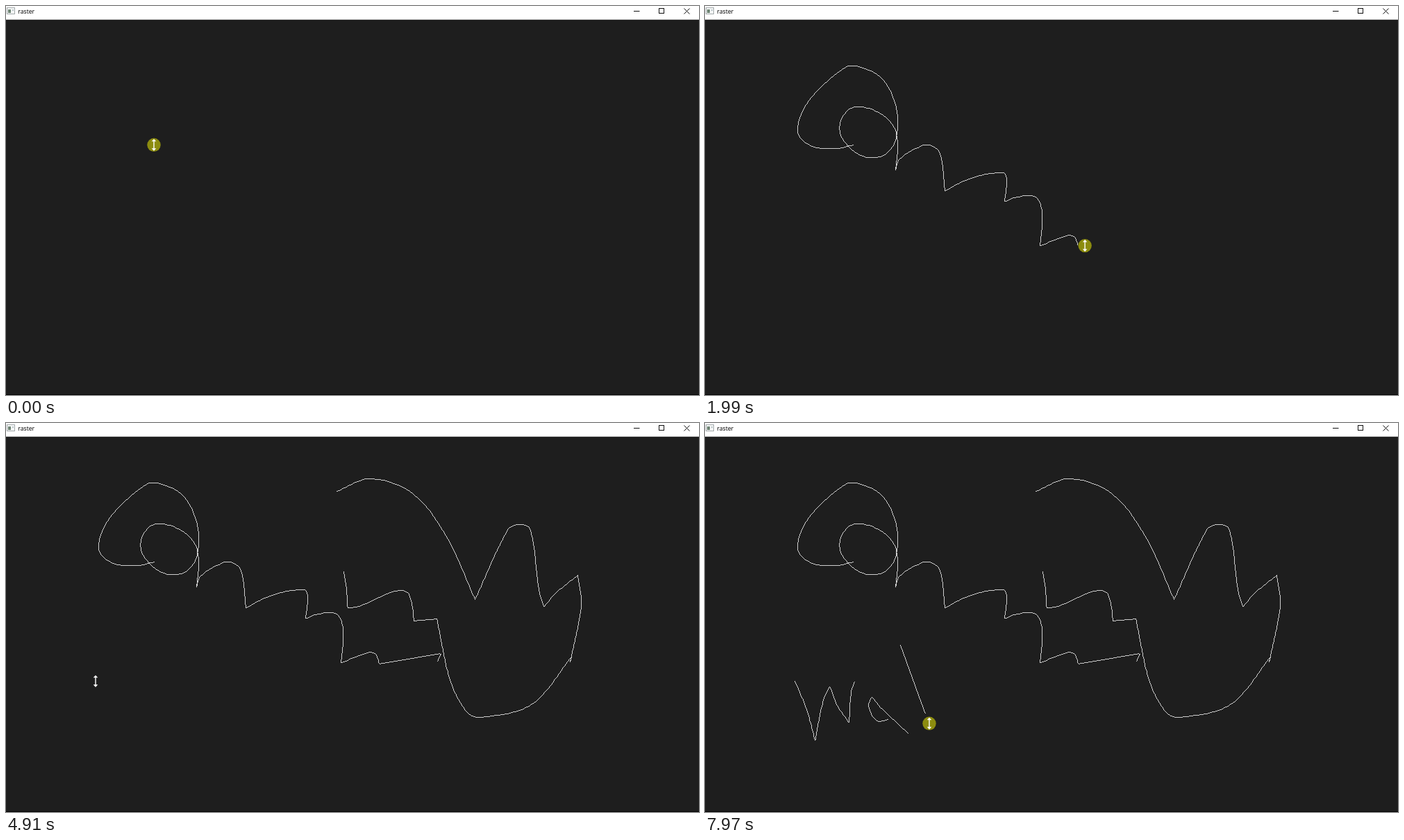
Recreate the animation shown at these times as an HTML page with a canvas. Size 998x561 px, loop 8 s.

```html
<!DOCTYPE html>
<html lang="en">
<head>
<meta charset="utf-8">
<title>raster</title>
<style>
  html, body { margin: 0; width: 100%; height: 100%; overflow: hidden; background: #1e1e1e; }
  canvas, svg { position: absolute; left: 0; top: 0; width: 998px; height: 561px; }
  .title { font: 8.7px "Open Sans", "Noto Sans", sans-serif; fill: #000; }
  .button { fill: none; stroke: #111; stroke-width: 1; }
</style>
</head>
<body>
<canvas id="ink" width="998" height="561"></canvas>
<svg viewBox="0 0 998 561">
  <rect y="560" width="998" height="1" fill="#050505"/>
  <rect width="998" height="19.7" fill="#fff"/>
  <g>
    <rect x="1.5" y="2.5" width="11" height="9" fill="#f4f6f6" stroke="#a3a9ab"/>
    <rect x="3" y="5" width="4" height="5" fill="#6f8574"/>
    <rect x="9" y="5" width="2" height="2" fill="#b9c4c8"/>
  </g>
  <text class="title" x="17.3" y="11">raster</text>
  <g class="button">
    <path d="M904 7.5H912.5"/>
    <rect x="940.5" y="3.5" width="7" height="7"/>
    <path d="M976.5 3.5L984.5 11.5M984.5 3.5L976.5 11.5"/>
  </g>
  <g id="cursor">
    <circle id="halo" r="9.7" fill="#ff0" fill-opacity=".49"/>
    <path d="M0-8.6L3.3-5H.7V5H3.3L0 8.6L-3.3 5H-.7V-5H-3.3Z" fill="#fff"/>
  </g>
</svg>
<script>
const LOOP = 8000, TICK = 66.42, LEAD = 18, INK_LAG = 0.4, SPACING = 3;

// Smooth curves through key points; "/" marks a sharp corner.
// A positive skew slows down along the way, a negative one speeds up.
const moves = [
  stroke(1, 33, 0.2, `213,200 188,205 152,201 133,180 150,135 200,89 221,87 254,104 274,142
    275,189 257,215 224,215 197,190 195,165 212,146 243,150 269,170 277,198 274,236 /
    280,220 312,201 326,201 338,212 345,266 / 382,248 429,240 434,250 431,282 /
    445,276 475,275 485,297 482,346 / 505,336 530,331 537,347 / 626,332 / 621,344`),
  hover(36, 40, 0, "621,344 520,140 476,98"),
  stroke(43, 55, -0.7, `476,98 524,80 585,101 634,164 675,254 / 722,154 738,146 754,152
    767,240 774,265 / 790,246 823,219 / 828,262 812,345 / 813,338`),
  stroke(55, 64, 0.5, `813,338 757,405 685,424 665,418 640,373 620,282 / 587,285 /
    583,255 575,242 554,244 508,264 491,266 / 490,240 486,213`),
  hover(67, 74, 0, "486,213 320,430 150,493 129,372"),
  stroke(77, 89, 0, `129,372 146,413 158,457 / 170,399 179,379 / 190,407 207,432 /
    210,388 215,372`),
  hover(92, 96, 0, "215,372 263,427"),
  stroke(100, 108, -0.25, "263,427 247,429 235,408 240,394 / 250,407 293,448"),
  hover(109, 112, 0, "293,448 281,319"),
  stroke(117, 120, 0, "281,320 307,393 323,433")
];
const presses = [[0, 34], [43, 65], [77, 91], [98, 109], [115, Infinity]];

const ink = document.getElementById("ink").getContext("2d");
const cursor = document.getElementById("cursor");
const halo = document.getElementById("halo");

function stroke(from, to, skew, text) {
  return { from, to, skew, pen: true, points: trace(text) };
}

function hover(from, to, skew, text) {
  return { from, to, skew, pen: false, points: trace(text) };
}

function direction(a, b) {
  const dx = b[0] - a[0], dy = b[1] - a[1], length = Math.hypot(dx, dy);
  return [dx / length, dy / length];
}

function curve(points) {
  const last = points.length - 1;
  const tangents = points.map((p, i) =>
    direction(points[Math.max(i - 1, 0)], points[Math.min(i + 1, last)]));
  const handle = (i, reach) => points[i].map((v, axis) => v + tangents[i][axis] * reach);
  let d = "";
  for (let i = 0; i < last; i++) {
    const [a, b] = [points[i], points[i + 1]];
    const reach = Math.hypot(b[0] - a[0], b[1] - a[1]) / 3;
    d += `C${handle(i, reach)} ${handle(i + 1, -reach)} ${b}`;
  }
  return d;
}

// Evenly spaced points along the whole curve.
function trace(text) {
  const runs = text.split("/").map(run => run.trim().split(/\s+/).map(p => p.split(",").map(Number)));
  const path = document.createElementNS("http://www.w3.org/2000/svg", "path");
  let d = `M${runs[0][0]}`;
  runs.forEach((run, i) => d += curve(i ? [runs[i - 1].at(-1), ...run] : run));
  path.setAttribute("d", d);
  const length = path.getTotalLength(), count = Math.ceil(length / SPACING);
  return Array.from({ length: count + 1 }, (_, i) => {
    const { x, y } = path.getPointAtLength(length * i / count);
    return [x, y];
  });
}

function progress(move, tick) {
  const p = Math.min(Math.max((tick - move.from) / (move.to - move.from), 0), 1);
  const eased = p * (1 + move.skew * (1 - p));
  return Math.round(eased * (move.points.length - 1));
}

// One pixel per step along the longer axis, without smoothing.
function drawLine(a, b) {
  const [x0, y0, x1, y1] = [...a, ...b].map(Math.round);
  const steps = Math.max(Math.abs(x1 - x0), Math.abs(y1 - y0));
  for (let i = 0; i < steps; i++) {
    const f = i / steps;
    ink.fillRect(Math.round(x0 + (x1 - x0) * f), Math.round(y0 + (y1 - y0) * f), 1, 1);
  }
}

function draw(tick) {
  let current = moves[0];
  ink.clearRect(0, 0, 998, 561);
  ink.fillStyle = "#cfcfcf";
  for (const move of moves) {
    if (tick >= move.from) current = move;
    if (!move.pen) continue;
    const end = progress(move, tick - INK_LAG);
    for (let i = 0; i < end; i++) drawLine(move.points[i], move.points[i + 1]);
  }
  const [x, y] = current.points[progress(current, tick)];
  cursor.setAttribute("transform", `translate(${x} ${y + 0.3})`);
  const pressed = presses.some(([from, to]) => tick >= from && tick < to);
  halo.setAttribute("visibility", pressed ? "visible" : "hidden");
}

let start = null, shown = -1;
function frame(now) {
  if (start === null) start = now;
  const tick = Math.floor(((now - start) % LOOP + LEAD) / TICK);
  if (tick !== shown) draw(shown = tick);
  requestAnimationFrame(frame);
}
draw(0);
requestAnimationFrame(frame);
</script>
</body>
</html>
```
